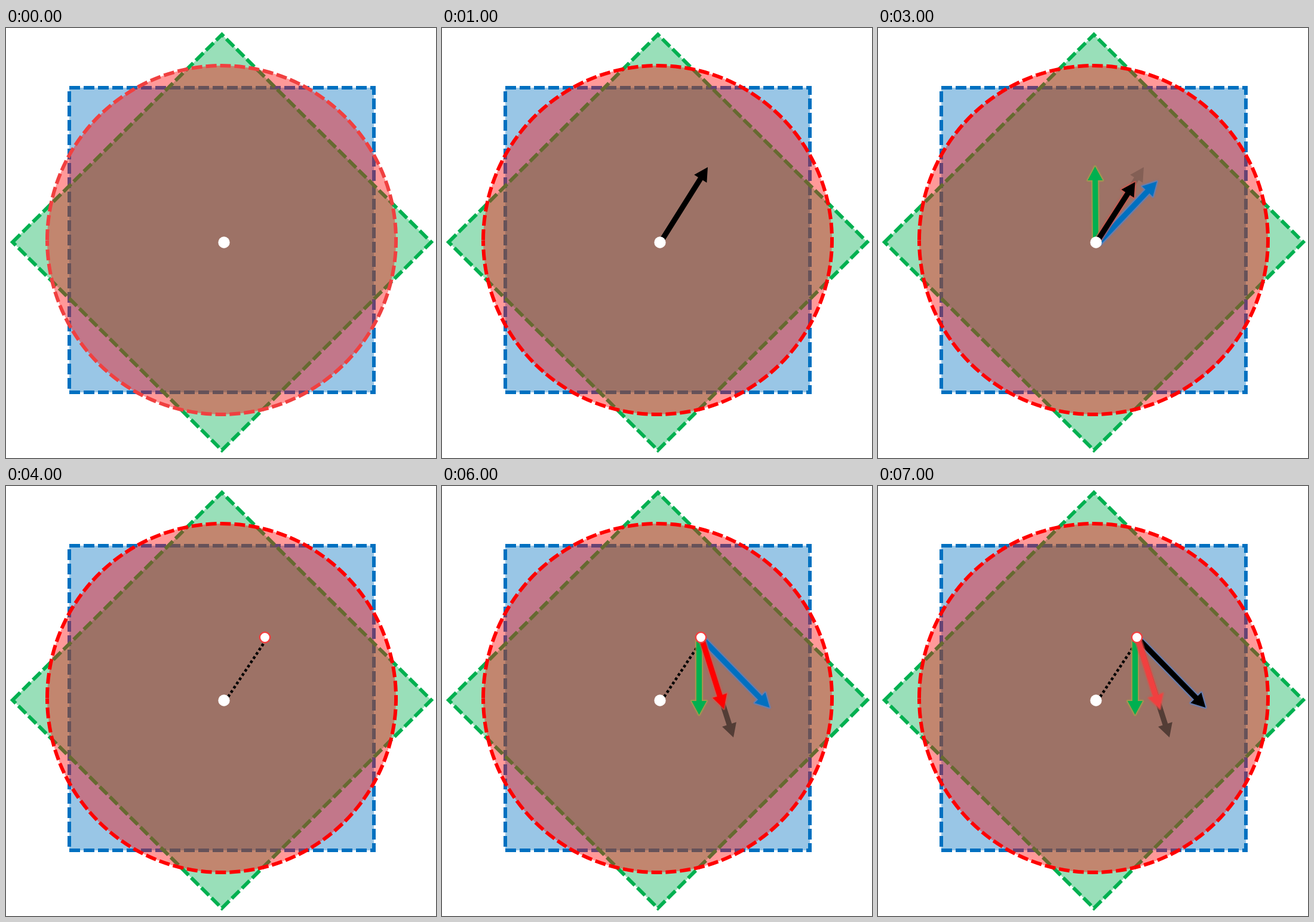
Write an HTML page with a canvas that moves like this. It is 720x720 px and loops after 8000 ms.

```html
<!DOCTYPE html>
<html lang="en">
<head>
<meta charset="utf-8">
<title>Choosing a direction, step by step</title>
<style>
html, body { margin: 0; width: 100%; height: 100%; overflow: hidden; background: #fff; }
canvas { display: block; }
</style>
</head>
<body>
<canvas id="stage" width="720" height="720"></canvas>
<script>
const ctx = document.getElementById('stage').getContext('2d');
const RED = '#ff0000', SOFT_RED = '#f04040', GREEN = '#00b050', BLUE = '#0070c0', BLACK = '#000';
const GLOW = { red: 'rgba(226,80,70,.5)', green: 'rgba(165,165,70,.6)', blue: 'rgba(85,130,200,.65)' };

const polygon = points => {
  const path = new Path2D();
  points.forEach(([x, y]) => path.lineTo(x, y));
  path.closePath();
  return path;
};

const square = polygon([[106, 100], [616, 100], [616, 610], [106, 610]]);
const diamond = polygon([[11, 358.5], [361.5, 11], [712, 358.5], [361.5, 707]]);
const circle = new Path2D();
circle.arc(361, 355, 292, Math.PI, 3 * Math.PI);

function region(path, color, outline = color) {
  ctx.globalAlpha = 0.4;
  ctx.fillStyle = color;
  ctx.fill(path);
  ctx.globalAlpha = 1;
  ctx.strokeStyle = outline;
  ctx.lineWidth = 6;
  ctx.setLineDash([18, 6]);
  ctx.stroke(path);
  ctx.setLineDash([]);
}

function arrow(x1, y1, x2, y2, color, { glow, alpha = 1 } = {}) {
  const length = Math.hypot(x2 - x1, y2 - y1), neck = length - 23;
  const shape = polygon([[0, -4.5], [neck, -4.5], [neck, -12.5], [length, 0],
                         [neck, 12.5], [neck, 4.5], [0, 4.5]]);
  ctx.save();
  ctx.translate(x1, y1);
  ctx.rotate(Math.atan2(y2 - y1, x2 - x1));
  ctx.globalAlpha = alpha;
  if (glow) {
    ctx.strokeStyle = ctx.shadowColor = glow;
    ctx.shadowBlur = 3;
    ctx.lineWidth = 4;
    ctx.lineJoin = 'round';
    ctx.stroke(shape);
    ctx.shadowColor = 'transparent';
  }
  ctx.fillStyle = color;
  ctx.fill(shape);
  ctx.restore();
}

function dot(x, y, radius, ring) {
  ctx.beginPath();
  ctx.arc(x, y, radius, 0, 2 * Math.PI);
  ctx.fillStyle = '#fff';
  ctx.fill();
  if (ring) {
    ctx.strokeStyle = ring;
    ctx.lineWidth = 2.5;
    ctx.stroke();
  }
}

function firstMove(phase) {
  if (phase === 1) arrow(367, 357, 445, 233, BLACK);
  if (phase < 2) return;
  arrow(367, 357, 445, 233, BLACK, { alpha: 0.17 });
  arrow(369, 360, 467, 257, BLUE, { glow: GLOW.blue });
  arrow(364.5, 357, 363.5, 232, GREEN, { glow: GLOW.green });
  arrow(367, 357, 430.5, 258, phase === 3 ? BLACK : RED, { glow: GLOW.red });
}

function secondMove(phase) {
  ctx.strokeStyle = BLACK;
  ctx.lineWidth = 4.5;
  ctx.setLineDash([4.5, 4]);
  ctx.beginPath();
  ctx.moveTo(372, 353);
  ctx.lineTo(433, 261);
  ctx.stroke();
  ctx.setLineDash([]);
  if (phase === 1) arrow(435, 256, 488, 421, BLACK);
  if (phase > 1) {
    arrow(435, 256, 488, 421, BLACK, { alpha: 0.47 });
    arrow(437, 257, 548.5, 371, phase === 3 ? BLACK : BLUE, { glow: GLOW.blue });
    arrow(430.5, 256, 430.5, 383, GREEN, { glow: GLOW.green });
    arrow(435, 256, 472, 373, phase === 3 ? SOFT_RED : RED, { glow: GLOW.red });
  }
  dot(433.5, 253.5, 8.7, SOFT_RED);
}

function draw(now) {
  const step = Math.floor(now / 1000) % 8;
  ctx.fillStyle = '#fff';
  ctx.fillRect(0, 0, 720, 720);
  region(square, BLUE);
  region(diamond, GREEN);
  region(circle, RED, step ? RED : SOFT_RED);
  if (step < 4) firstMove(step);
  else secondMove(step - 4);
  dot(365, 359, 9.7);
  requestAnimationFrame(draw);
}
draw(0);
</script>
</body>
</html>
```
